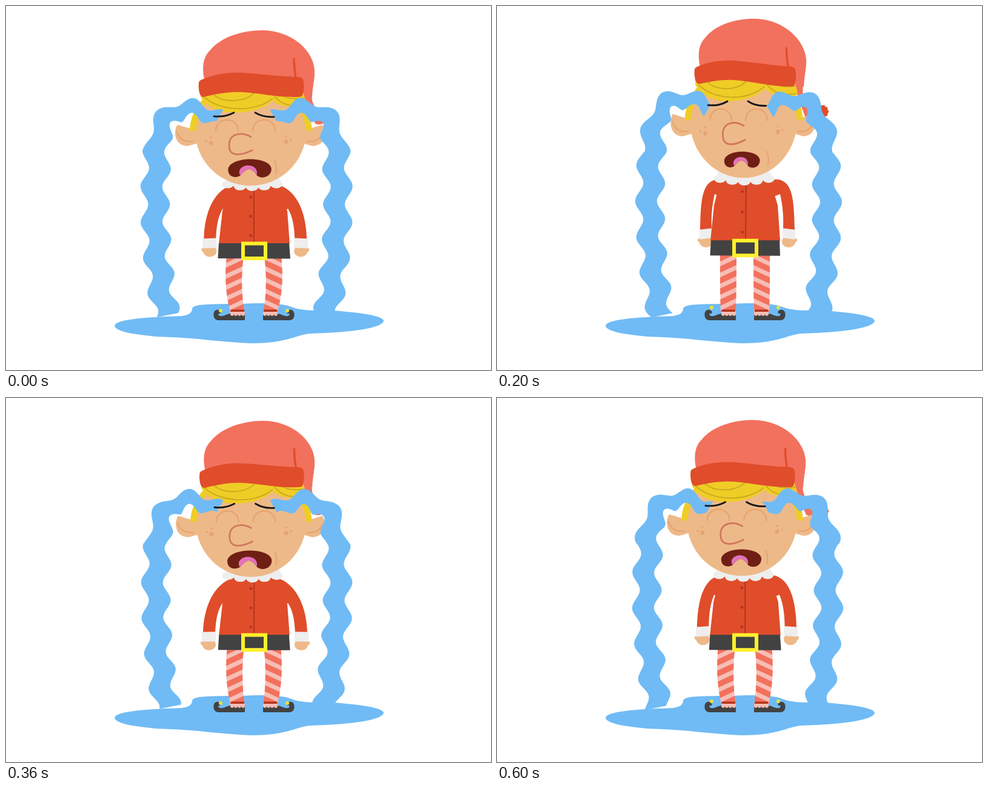
An HTML page with a canvas that plays this animation: 800x600 px, repeating every 640 ms.

```html
<!DOCTYPE html>
<html lang="en">
<head>
<meta charset="utf-8">
<title>Crying elf</title>
<style>
  html, body { margin: 0; width: 100%; height: 100%; overflow: hidden; background: #fff; }
  canvas { display: block; }
</style>
</head>
<body>
<canvas id="stage" width="800" height="600"></canvas>
<script>
const ctx = document.getElementById('stage').getContext('2d');
const STEP = 40, POSES = 8, TAU = 2 * Math.PI;
const WAVE = 59, RIPPLE = 6.5;

const C = {
  water: '#70bbf5', skin: '#eeb988', crease: '#e5a471', nose: '#d1775f',
  hair: '#efcd26', strand: '#c5a51f', hat: '#f2715d', red: '#e04d2a',
  dark: '#b4351c', white: '#eeeeee', belt: '#424242', buckle: '#fff02c',
  mouth: '#701f15', tongue: '#e372bb', pink: '#f7beb5', lash: '#161616'
};

// The whole figure bobs on one sine; looser parts trail behind by a lag
function stateAt(p) {
  const bob = lag => (1 - Math.cos(TAU * (p - lag))) / 2;
  const body = bob(0), head = bob(.03), loose = bob(.12);
  return {
    squeeze: 1.15 * body,
    stretch: 1.09 * head,
    hatL: -24 * head,
    hatR: -20 * body,
    mouth: loose,
    mouthY: -14 * head,
    collar: -10 * head,
    belt: -5.6 * body,
    arm: loose,
    bell: -6 * loose,
    pomY: 188 - 18 * bob(-.03),
    tearX: 246 + 7.5 * body,
    spoutY: -20.5 * head,
    wave: WAVE * p - 14 * head
  };
}

const mix = (a, b, k) => a.map((v, i) => v + (b[i] - v) * k);

// Builds a path from command letters and a flat list of coordinates
function path(cmds, n) {
  const p = new Path2D();
  let i = 0;
  for (const c of cmds) {
    if (c === 'M') p.moveTo(n[i++], n[i++]);
    else if (c === 'L') p.lineTo(n[i++], n[i++]);
    else if (c === 'Q') p.quadraticCurveTo(n[i++], n[i++], n[i++], n[i++]);
    else if (c === 'C') p.bezierCurveTo(n[i++], n[i++], n[i++], n[i++], n[i++], n[i++]);
    else p.closePath();
  }
  return p;
}

function fill(p, color) {
  ctx.fillStyle = color;
  ctx.fill(typeof p === 'string' ? new Path2D(p) : p);
}

function line(p, color, w) {
  ctx.strokeStyle = color;
  ctx.lineWidth = w;
  ctx.lineCap = 'round';
  ctx.stroke(typeof p === 'string' ? new Path2D(p) : p);
}

function oval(x, y, rx, ry, color) {
  ctx.beginPath();
  ctx.ellipse(x, y, rx, ry, 0, 0, TAU);
  ctx.fillStyle = color;
  ctx.fill();
}

function box(x, y, w, h, color) {
  ctx.fillStyle = color;
  ctx.fillRect(x, y, w, h);
}

// Draws a part inside its own transform
function within(m, draw) {
  ctx.save();
  ctx.transform(...m);
  draw();
  ctx.restore();
}

// Draws a part as is and again flipped, x becoming sum - x
function pair(sum, draw, dy = 0) {
  draw();
  within([-1, 0, 0, 1, sum, dy], draw);
}

function drawPuddle() {
  fill('M179 527 C181 517 225 513 290 511 C304 509 307 504 307 499 C309 492 325 491 390 491 ' +
    'C420 489 455 490 468 495 C490 504 510 501 540 502 C580 505 622 510 623 519 ' +
    'C622 530 575 538 500 540 C478 543 460 556 405 556 C340 553 320 547 250 545 ' +
    'C215 542 180 537 179 527Z', C.water);
}

function drawLegs(s) {
  const leg = path('MCLCZ', mix(
    [364,412, 361,440, 361,470, 370,504, 393.5,504, 388,475, 388,440, 392,412],
    [368,408, 368,440, 368,470, 369,504, 394,504, 395,475, 395,440, 395,408], s.squeeze));
  pair(818, () => {
    ctx.save();
    ctx.clip(leg);
    box(355, 405, 45, 100, C.pink);
    for (let y = 422; y < 520; y += 18.3) line(`M355 ${y} l45 -21`, C.hat, 9.5);
    ctx.restore();
    fill('M394 508 L394 518 L350 518 C341 518 340 503 347 501 C352 500 356 503 354 507 ' +
      'C352 506 349 507 351 510 C357 514 364 507 371 507Z', C.belt);
    box(370, 504, 24, 4, C.pink);
    for (let x = 373; x < 394; x += 6) oval(x, 508, 2.8, 2.8, C.pink);
    box(371, 500.5, 22, 3.5, C.dark);
    oval(354, 503 + s.bell, 3, 3, '#e9e23c');
  });
}

function drawBody(s) {
  const k = s.arm, top = s.collar, low = s.belt, q = s.squeeze;
  const arm = path('MLCLCLZ', mix(
    [385,297, 368,299, 345,310, 326,340, 325,388, 345,388, 346,365, 349,350, 357,338, 385,345],
    [385,285, 362,286, 338,290, 336,320, 335,370, 354,368, 353,345, 355,328, 359,310, 385,320], k));
  pair(822 + 4 * k, () => {
    const x = 334.5 + 10 * k, y = 393.5 - 18 * k;
    oval(x + .5, y + 13, 11, 9.5, C.skin);
    oval(x - 9, y + 10.5, 4.5, 4, C.skin);
    fill(arm, C.red);
    within([1, -.03 - .08 * k, 0, 1, x, y], () => box(-11.7 + k, -8, 23.4 - 2 * k, 16, C.white));
  });
  fill(path('MLLLLLZ', [368,297 + top, 451,297 + top, 464 - q,338 + top,
    468 - q,392 + low, 351 + q,392 + low, 357 + q,338 + top]), C.red);

  line(path('ML', [409 + 2 * q,301 + top, 409 + q,391 + low]), C.dark, 2);
  for (let i = 0; i < 3; i++)
    oval(403.7 + q, 315 + i * 31.7 + top + (low - top) * i / 2.5, 2.4, 2.4, C.dark);

  fill(path('MLLLZ', [351 + 2 * q,391 + low, 467 - q,391 + low,
    469 - 2 * q,416.5 + low, 349.5 + 2 * q,416 + low]), C.belt);
  ctx.strokeStyle = C.buckle;
  ctx.lineWidth = 6;
  ctx.strokeRect(391, 391.5 + low, 37, 24.5);

  // scalloped collar
  fill(path('MQLQZ', [359 + 3 * q,293 + top, 405,307 + top, 455,293 + top,
    450,282 + top, 405,278 + top, 364,282 + top]), C.white);
  for (let i = -2; i <= 2; i++)
    oval(406 + 20 * i + 2 * q, 298.5 - 1.1 * i * i + top, 10, 6.5, C.white);
}

function drawTail(s) {
  const x = 536, y = s.pomY, d = s.hatR;
  fill(path('MCCQLZ', [509,112 + d, 507,140 + d, 500,150 + d * .5,
    509,165 + d * .4, 513,172 + d * .3, 522,y - 5, x,y - 6,
    524,y + 12, 510,194 + d * .4, 488,145 + d]), C.hat);
  oval(x, y, 9, 9, C.red);
  for (let a = 0; a < TAU; a += TAU / 10)
    oval(x + 8 * Math.cos(a), y + 8 * Math.sin(a), 3, 3, C.red);
}

function headMatrix(s) {
  const w = .035 * s.squeeze;
  return [1 - w, 0, 0, 1 + .05 * s.stretch, 495 * w, -27.8 * s.stretch];
}

function drawHead() {
  pair(805, () => {
    fill('M316 206 L283 196 C276 204 276 231 300 231 L318 226Z', C.skin);
    line('M282 208 C287 222 296 224 308 223.5', C.crease, 2.2);
  });
  oval(403.5, 205, 91.7, 91.3, C.skin);
  pair(808, () => fill('M326 152 C314 166 304 182 303 206 L313 206 C315 190 319 178 330 160Z', C.hair));
  fill('M322 135 L321 150 C335 172 360 176 380 176 C407 175 430 167 439 156 ' +
    'C450 166 470 168 497 166 L488 135Z', C.hair);
  line('M342 146 C358 160 393 160 410 143', C.strand, 1.6);
  line('M327 150 C352 174 410 177 439 153', C.strand, 1.6);
  line('M443 149 C455 164 472 167 495 164', C.strand, 1.6);
  line('M455 147 C463 153 477 154 492 152', C.strand, 1.6);
}

function drawHat(s) {
  const tilt = (s.hatR - s.hatL) / 170, q = s.squeeze;
  within([1 - .036 * q, tilt, 0, 1, 19.5 * q, s.hatL - 320 * tilt], () => {
    fill('M328 125 C323 104 324 86 336 74 C354 51 390 40 424 40 C472 41 507 73 509 106 ' +
      'C509 122 505 135 505 150 L490 142Z', C.hat);
    line('M475 87 C475 98 476 107 478 118', C.red, 3.4);
    fill('M322 122 C340 114 360 110 382 110 C415 111 440 116 484 117 Q491 118 491 126 ' +
      'C492 135 491 142 489 147 Q488 150 482 150 C440 151 415 142 378 142 ' +
      'C355 143 340 147 327 150 Q321 151 319 143 C317 133 318 129 318 126 Q319 123 322 122Z', C.red);
  });
}

// Middle of the stream: an arch out of the eye, then a shallow bow downwards
function streamLine(s) {
  const bow = y => s.tearX + .00052 * (y - 322) ** 2;
  const joint = 240, lift = s.spoutY, pts = [];
  const bezier = (a, b, c, d, t) => {
    const u = 1 - t;
    return a * u * u * u + 3 * b * u * u * t + 3 * c * u * t * t + d * t * t * t;
  };
  for (let i = 0; i < 40; i++) {
    const t = i / 40;
    pts.push({
      x: bezier(354, 300, s.tearX + 5, bow(joint), t),
      y: bezier(188 + lift, 155 + lift, 165 + lift * .8, joint, t),
      half: 11 + 7 * t ** 1.5
    });
  }
  for (let y = joint; y <= 514; y += 3) pts.push({ x: bow(y), y, half: 18 });
  return pts;
}

// Both edges follow a wave that runs down the stream
function tearPath(s) {
  const pts = streamLine(s), outer = [], inner = [];
  let dist = pts[pts.length - 1].y;
  for (let i = pts.length - 2; i > 0; i--) {
    const a = pts[i - 1], b = pts[i + 1], p = pts[i];
    const len = Math.hypot(b.x - a.x, b.y - a.y);
    const tx = (b.x - a.x) / len, ty = (b.y - a.y) / len;
    dist -= len / 2 * (1 + .23 * Math.abs(tx));
    const sway = RIPPLE * Math.cos(TAU * (dist - 292 - s.wave) / WAVE);
    const edge = d => [p.x - ty * d, p.y + tx * d];
    outer.unshift(edge(sway + p.half));
    inner.push(edge(sway - p.half));
  }
  const shape = new Path2D();
  for (const e of [...outer, ...inner]) shape.lineTo(...e);
  shape.closePath();
  return shape;
}

function drawTears(s) {
  const tear = tearPath(s);
  pair(793.5 + 3.5 * s.squeeze, () => fill(tear, C.water), 1.5 * s.squeeze);
}

function drawFace(s) {
  for (const x of [346, 407]) {
    const bag = `M${x} 206 C${x} 182 ${x + 37} 182 ${x + 37} 206`;
    fill(bag, C.skin);
    line(bag, C.crease, 2.4);
  }
  pair(800, () => {
    oval(338, 226, 3.5, 3.5, C.crease);
    oval(330, 223, 1.8, 1.8, C.crease);
    oval(338, 217, 1.8, 1.8, C.crease);
  }, -2);
  line('M443 255 Q448 266 445 276', C.crease, 2.2);
  line('M343 182 Q361 184 376 176', C.lash, 2.8);
  line('M411 176 Q424 184 442 183', C.lash, 2.8);
  within([1, 0, 0, 1, 0, -1.5 * s.mouth], () =>
    line('M404 216 C390 208 368 209 368 230 C368 251 390 246 406 238', C.nose, 2.8));
}

function drawMouth(s) {
  const w = 1 - .2 * s.mouth, h = 1 - .13 * s.mouth;
  within([w, 0, 0, h, 401.5 + 2.5 * s.mouth - 401.5 * w, 253 + s.mouthY - 253 * h], () => {
    fill('M365 270 C367 247 437 247 438.5 269 C438 284 421 286 414 280 ' +
      'C410 273 405 270 400 269 C394 271 390 275 386 280 C378 285 365 283 365 270Z', C.mouth);
    fill('M386 280 C380 272 388 263 399 263 C411 263 416 272 413.5 279 ' +
      'C410 273 405 270 400 269 C394 271 390 275 386 280Z', C.tongue);
  });
}

function draw(p) {
  const s = stateAt(p), head = headMatrix(s);
  box(0, 0, 800, 600, '#fff');
  drawPuddle();
  drawLegs(s);
  drawBody(s);
  drawTail(s);
  within(head, drawHead);
  drawHat(s);
  drawTears(s);
  within(head, () => drawFace(s));
  drawMouth(s);
}

const start = performance.now();
function tick() {
  const pose = Math.floor((performance.now() - start) / STEP) % POSES;
  draw(pose / POSES);
  requestAnimationFrame(tick);
}
tick();
</script>
</body>
</html>
```
